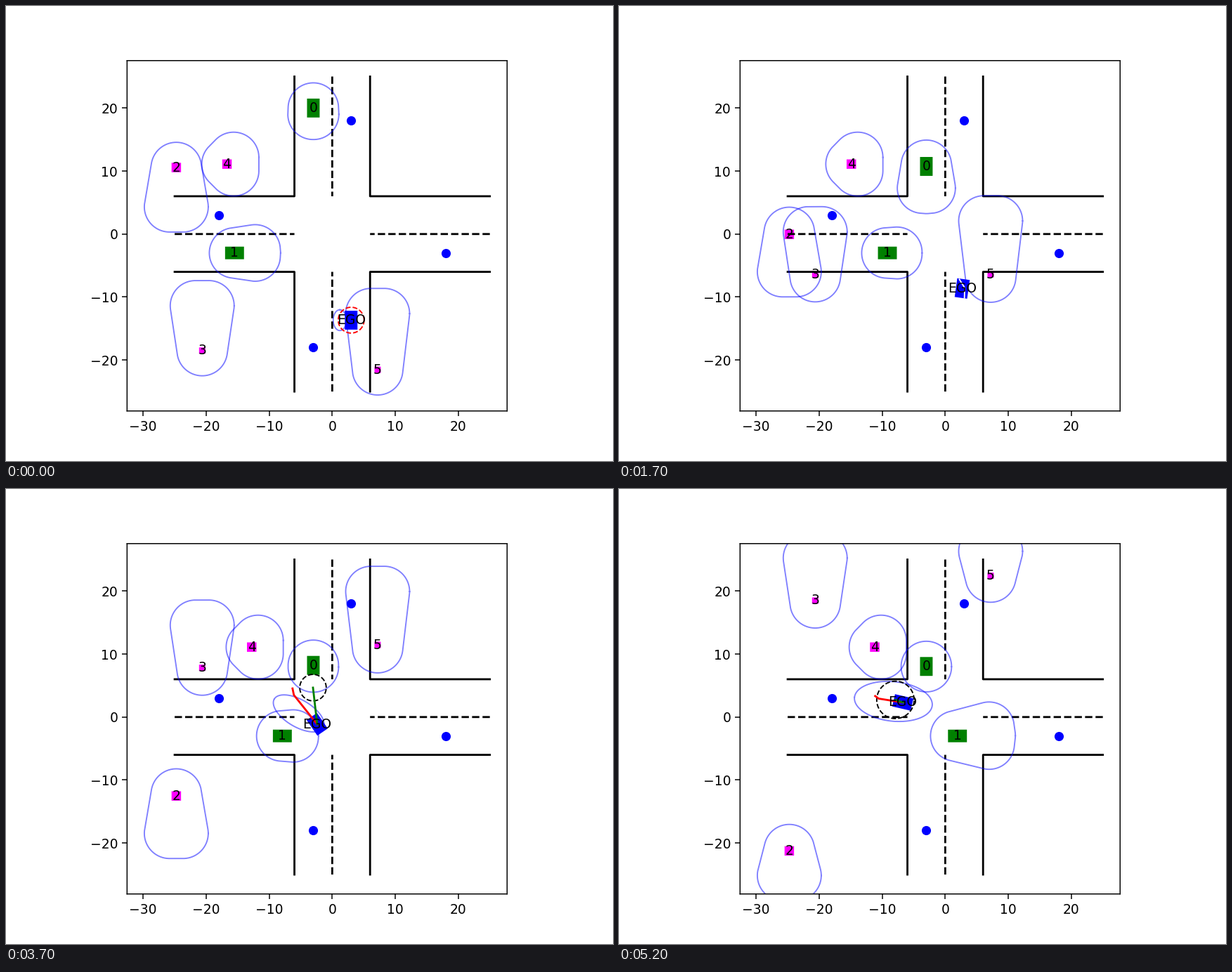
A matplotlib script for the animation above (5.25 s loop, 864 by 648 pixels).

```python
import numpy as np
import matplotlib.pyplot as plt
from matplotlib.animation import FuncAnimation

FRAMES, INTERVAL = 105, 50
HORIZON = 20      # frames looked ahead by the reachable sets
MARGIN = 4.0      # safety distance around them
ANGLES = np.linspace(0, 2 * np.pi, 241)
UNIT = np.column_stack([np.cos(ANGLES), np.sin(ANGLES)])


def ray(length, degrees):
    a = np.radians(degrees)
    return length * np.array([np.cos(a), np.sin(a)])


def rotate(points, degrees):
    (c, s) = ray(1, degrees)
    return np.asarray(points) @ np.array([[c, s], [-s, c]])


def box(centre, length, width, degrees):
    corners = np.array([(1, 1), (-1, 1), (-1, -1), (1, -1)]) / 2
    return centre + rotate(corners * (length, width), degrees)


def buffered(points, r):
    """Convex outline of the points grown by r."""
    points = np.asarray(points)
    ring = points[np.argmax(UNIT @ points.T, axis=1)] + r * UNIT
    return np.vstack([ring, ring[:1]])


def travel(s, speed, rule):
    """Coordinate per frame, with the speed updated by rule(n, s, speed)."""
    track = [s]
    for n in range(1, FRAMES + 1):
        s += speed
        track.append(s)
        speed = rule(n, s, speed)
    return np.array(track)


def stroll(n, s, speed):
    """Steady walk that slows down when leaving the area."""
    return np.clip(speed, -0.205, 0.205) if s * speed > 0 and abs(s) > 20 else speed


def driver(*legs):
    """Legs are (first frame, stop, cruising speed)."""
    def rule(n, s, speed):
        _, stop, cruise = [leg for leg in legs if n >= leg[0]][-1]
        want = np.clip(0.063 * (stop - s), -cruise, cruise)
        return speed + np.clip(want - speed, -0.028, 0.028)
    return rule


class Agent:
    def __init__(self, track, place, heading, size, width, colour, turning):
        steps = range(FRAMES + 1)
        self.pos = np.array([place(s) for s in track])
        self.heading = [heading(track[n]) for n in steps]
        self.size, self.width = size, width
        self.colour, self.turning = colour, turning

    def reach(self, l):
        if not self.turning:
            return [(0, 0), (l, 1.07), (l, -1.07)]
        side = 0.045 * l * l
        ahead = np.sqrt(l * l - side * side)
        return [(0, 0), (l, 0), (ahead, side), (ahead, -side)]

    def outline(self, n):
        k = max(n - 1, 0)
        l = HORIZON * np.hypot(*(self.pos[k + 1] - self.pos[k]))
        return buffered(self.pos[k] + rotate(self.reach(l), self.heading[k]), MARGIN)

    def body(self, n):
        return box(self.pos[n], self.size, self.width, self.heading[n])


def car(track, place, heading):
    return Agent(track, place, heading, 3, 2, "green", True)


def walker(start, speed, place, heading, size):
    return Agent(travel(start, speed, stroll), place, lambda s: heading,
                 size, size, "magenta", False)


def swerve(x):
    """Small dip in the lane while crossing: phase of one wave."""
    return np.pi * np.clip((x + 8) / 10, 0, 1)


agents = [
    car(travel(20, -0.05, driver((0, 8, 0.36))),
        lambda s: (-3, s), lambda s: -90),
    car(travel(-15.5, 0.165, driver((0, -8, 0.24), (71, 6, 0.39))),
        lambda s: (s, -3 - 0.14 * np.sin(swerve(s)) ** 2),
        lambda s: -2.5 * np.sin(2 * swerve(s))),
    walker(10.56, -0.312, lambda s: (-24.74, s), -90, 1.5),
    walker(-18.5, 0.3556, lambda s: (-20.63, s), 90, 1.0),
    walker(-16.7, 0.053, lambda s: (s, 11.1), 0, 1.5),
    walker(-21.55, 0.446, lambda s: (7.2, s), 90, 1.0),
]

# frame, x, y, heading of the left turn
TURN = np.array([(0, 3, -13.67, 90), (18, 2.5, -10.3, 90), (34, 2.69, -8.64, 82),
                 (47, 2.55, -8.16, 97), (63, -.82, -3.87, 125),
                 (85, -3.78, .98, 125), (104, -6.73, 2.32, 167)])
TIMES, POSES = TURN[:, 0], TURN[:, 1:]
SLOPES = np.gradient(POSES, TIMES, axis=0)
PHASES = [(0, "wait"), (33, "lost"), (36, "go"), (80, "wait"), (90, "go")]


def ego_pose(n):
    """Cubic curve through the turn's key poses."""
    i = min(np.searchsorted(TIMES, n, side="right"), len(TIMES) - 1) - 1
    h = TIMES[i + 1] - TIMES[i]
    s = (n - TIMES[i]) / h
    return ((1 + 2 * s) * (1 - s) ** 2 * POSES[i] + s * (1 - s) ** 2 * h * SLOPES[i]
            + s * s * (3 - 2 * s) * POSES[i + 1] + s * s * (s - 1) * h * SLOPES[i + 1])


plt.rcParams["path.snap"] = False
fig, ax = plt.subplots(figsize=(6.4, 4.8), dpi=135)
ax.set_aspect("equal")
ax.set_xlim(-32.55, 27.74)
ax.set_ylim(-28.08, 27.53)

for sx in (-1, 1):
    for sy in (-1, 1):
        ax.plot([25 * sx, 6 * sx, 6 * sx], [6 * sy, 6 * sy, 25 * sy], "k-")
    ax.plot([0, 0], [25 * sx, 6 * sx], "k--")
    ax.plot([25 * sx, 6 * sx], [0, 0], "k--")
for x, y in [(3, 18), (-18, 3), (18, -3), (-3, -18)]:
    ax.plot(x, y, "bo")


def add_body(colour, label):
    patch = plt.Polygon(np.zeros((4, 2)), fc=colour, lw=0)
    ax.add_patch(patch)
    return patch, ax.text(0, 0, label, ha="center", va="center")


def add_line(style, **kw):
    return ax.plot([], [], style, **kw)[0]


bodies = [add_body(a.colour, str(i)) for i, a in enumerate(agents)]
outlines = [add_line("b-", lw=1, alpha=0.5) for _ in agents]
ego_body, ego_label = add_body("blue", "EGO")
ego_reach = add_line("b-", lw=1, alpha=0.5)
circle = add_line("--", lw=1)
path = add_line("r-")
link = add_line("g-")
streak = add_line("w-", lw=1)


def draw_plan(n, ego, heading):
    start, phase = [p for p in PHASES if n >= p[0]][-1]
    age = n - start
    tilt = np.interp(n, [0, 63, 85, 104], [90, 99, 200, 174])
    if phase == "go":
        # the goal circle runs ahead and shrinks
        s = np.clip((age - 10.6) / 16, 0, 1)
        goal, r = ego + ray(5.85 * s, heading - 28 * s), 3.2 - 1.1 * s
        length = 3.1 + 0.1 * age
        centre = ego + ray(1 + 2.4 * s, tilt)
        axes = (6.2 if ego[0] < -5 else 4.5, 3.4 - 1.25 * s)
    else:
        goal, r = ego, 2.05
        length = 0.03 * age
        centre = ego + ray(1.8 + 0.075 * age, 270 - heading)
        axes = (1.65 + 0.165 * age, 1.05 + 0.136 * age)

    aim = max(heading, 124)
    bend, tip = ego + ray(0.86 * length, aim + 4), ego + ray(length, aim)
    ego_reach.set_data(*(centre + rotate(UNIT * axes, tilt)).T)
    circle.set_data(*(goal + r * UNIT).T)
    circle.set_color("red" if phase == "wait" else "black")
    path.set_data(*np.array([ego, bend, tip]).T)
    link.set_data(*np.array([ego, goal]).T)
    streak.set_data(*(ego + np.array([(-0.45, 1.45), (0.4, 0.1), (0.35, -1.5)])).T)
    for line in (ego_reach, circle, path, link):
        line.set_visible(phase != "lost")
    streak.set_visible(phase == "lost")


def draw(n):
    for agent, (patch, label), line in zip(agents, bodies, outlines):
        patch.set_xy(agent.body(n))
        label.set_position(agent.pos[n])
        line.set_data(*agent.outline(n).T)
    x, y, heading = ego_pose(n)
    ego = np.array([x, y])
    ego_body.set_xy(box(ego, 3, 2, heading))
    ego_label.set_position(ego)
    draw_plan(n, ego, heading)
    return []


anim = FuncAnimation(fig, draw, frames=FRAMES, interval=INTERVAL, repeat=True)
plt.show()
```
